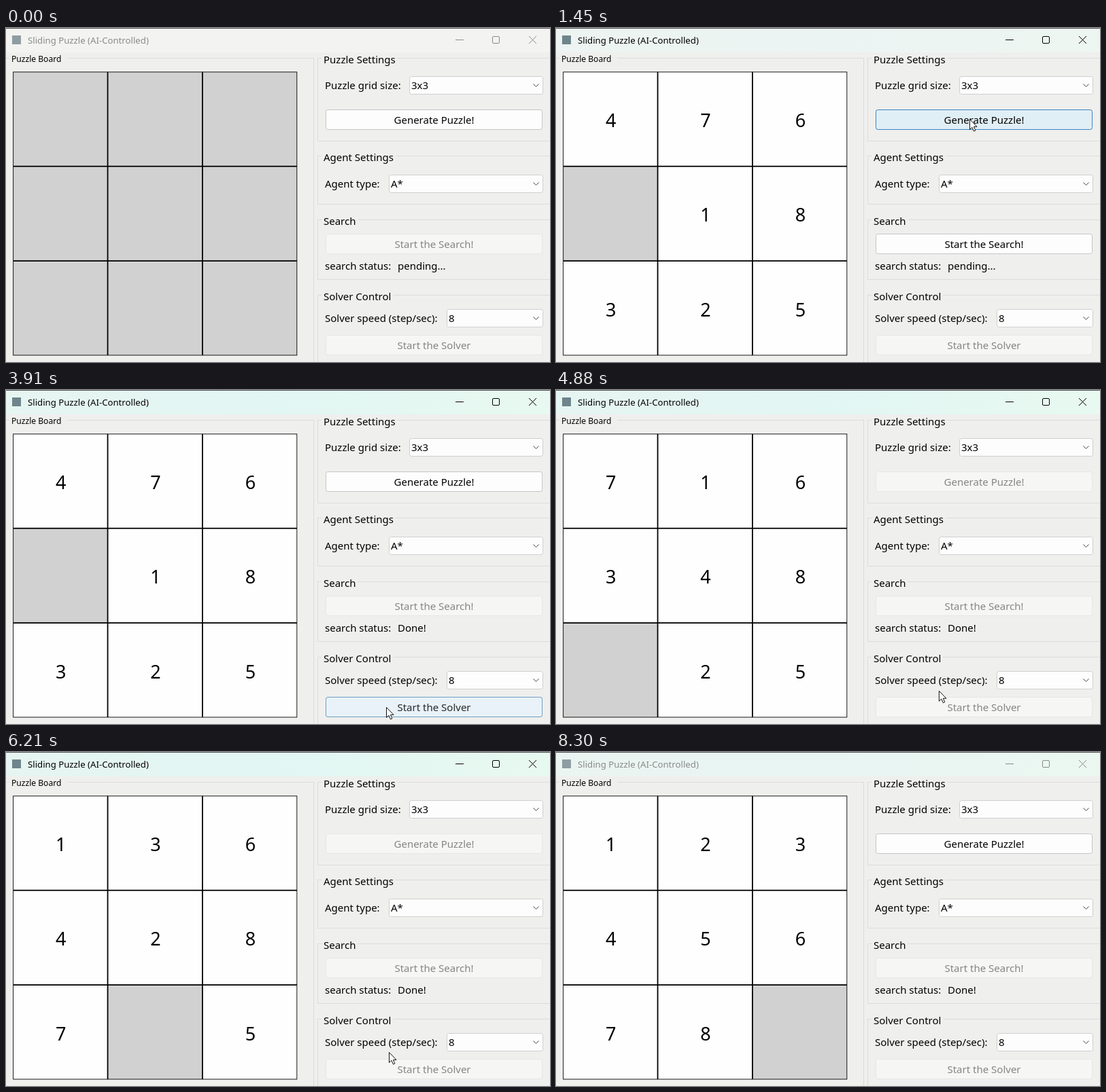
Animation, 800 px wide and 492 px high, one loop 8330 ms. Source, as an HTML page with a canvas:

```html
<!DOCTYPE html>
<html lang="en">
<head>
<meta charset="utf-8">
<title>Sliding Puzzle</title>
<style>
html, body { margin: 0; width: 100%; height: 100%; overflow: hidden; background: #efefee; }
canvas { display: block; }
</style>
</head>
<body>
<canvas id="stage" width="800" height="492"></canvas>
<script>
const ctx = document.getElementById('stage').getContext('2d');

const START = '476018325', MOVES = 'URDLDRULURDDLURDRUULDDR';
const OFFSET = { U: -3, D: 3, L: -1, R: 1 };

// Event times in ms
const LOOP = 8330, STEP = 126, FIRST_STEP = 4270;
const FOCUS = 1330, GENERATE = 1385, SEARCH = 2640, FOUND = 2700, SOLVE = 4010, BLUR = 8210;
const SOLVED = FIRST_STEP + STEP * MOVES.length;

// Pointer glides: start time and destination
const GLIDE = 720, ENTER = 550, LEAVE = 6750;
const STOPS = [[ENTER, 608, 134], [1760, 580, 317], [3150, 559, 467], [4240, 563, 442], [LEAVE, 560, 496]];

// 0 before a, rising to 1 over the duration
const fade = (t, a, duration) => Math.min(1, Math.max(0, (t - a) / duration));
const pulse = (t, a, b, duration) => fade(t, a, duration) - fade(t, b, duration);
const enabled = (t, a, b) => pulse(t, a, b, 50);
const hovered = (t, a, b) => pulse(t, a, b, 240);

function text(s, x, y, size = 15, color = '#000', align = 'left') {
  ctx.font = `${size}px "Noto Sans", "Open Sans", sans-serif`;
  ctx.textAlign = align;
  ctx.fillStyle = color;
  ctx.fillText(s, x, y);
}

function rect(x, y, w, h, color) {
  ctx.fillStyle = color;
  ctx.fillRect(x, y, w, h);
}

function line(color, ...points) {
  ctx.strokeStyle = color;
  ctx.beginPath();
  for (let i = 0; i < points.length; i += 2) ctx.lineTo(points[i], points[i + 1]);
  ctx.stroke();
}

function box(x, y, w, h, fill, border, radius = 3) {
  ctx.beginPath();
  ctx.roundRect(x + .5, y + .5, w - 1, h - 1, radius);
  ctx.fillStyle = fill;
  ctx.fill();
  ctx.strokeStyle = border;
  ctx.stroke();
}

function titleBar(t) {
  const active = t >= FOCUS && t < BLUR;
  const ink = active ? '#000' : '#8a8a8a';
  rect(0, 0, 800, 36, '#f3f3f2');
  const tint = ctx.createLinearGradient(0, 0, 800, 0);
  tint.addColorStop(0, '#e6f5f1');
  tint.addColorStop(.5, '#e2f6f3');
  tint.addColorStop(1, '#e7f9f0');
  ctx.globalAlpha = pulse(t, FOCUS, BLUR, 260);
  rect(0, 0, 800, 36, tint);
  ctx.globalAlpha = 1;
  rect(0, 0, 800, 1, '#555');
  rect(9, 11, 13, 13, active ? '#6f858c' : '#8e9da2');
  text('Sliding Puzzle (AI-Controlled)', 32, 22.5, 13.2, ink);
  line(ink, 661, 17.5, 673, 17.5);
  box(715, 12, 11, 11, 'transparent', ink, 1.5);
  line(ink, 769, 12, 780, 23);
  line(ink, 780, 12, 769, 23);
}

function group(label, top, bottom) {
  text(label, 467, top + 8);
  const end = 470 + ctx.measureText(label).width;
  line('#dcdcdc', 464, top + .5, 458.5, top + .5, 458.5, bottom + .5, 800, bottom + .5);
  line('#dcdcdc', end, top + .5, 800, top + .5);
}

function combo(label, value, x, y) {
  text(label, 469, y + 19);
  box(x, y, 790 - x, 27, '#fdfdfd', '#cfcfcf');
  text(value, x + 3, y + 19);
  line('#444', 775.5, y + 11.5, 779.5, y + 15.5, 783.5, y + 11.5);
}

function button(label, y, on, hover) {
  const layer = (alpha, fill, border, ink) => {
    ctx.globalAlpha = alpha;
    box(470, y, 319, 30, fill, border);
    text(label, 629.5, y + 21, 15, ink, 'center');
  };
  layer(1, '#f6f6f5', '#e6e6e5', '#858585');
  if (on) layer(on, '#fdfdfd', '#c6c6c6', '#000');
  if (on * hover) layer(on * hover, '#e0eef6', '#3c86bd', '#000');
  ctx.globalAlpha = 1;
}

function boardAt(t) {
  const tiles = [...START];
  const steps = Math.floor((t - FIRST_STEP) / STEP) + 1;
  let hole = tiles.indexOf('0');
  for (const move of MOVES.slice(0, Math.max(0, steps))) {
    const next = hole + OFFSET[move];
    [tiles[hole], tiles[next]] = [tiles[next], '0'];
    hole = next;
  }
  return tiles;
}

function board(t) {
  const left = 10.2, top = 64.4, pitch = 139.35, edge = .9;
  text('Puzzle Board', 8, 49.5, 12.1);
  line('#dcdcdc', 0, 44.5, 5, 44.5);
  line('#dcdcdc', 90, 44.5, 452.5, 44.5, 452.5, 492);
  rect(left, top, 3 * pitch, 3 * pitch, '#000');
  boardAt(t).forEach((tile, i) => {
    const x = left + i % 3 * pitch, y = top + Math.floor(i / 3) * pitch;
    const shown = t >= GENERATE && tile !== '0';
    rect(x + edge, y + edge, pitch - 2 * edge, pitch - 2 * edge, shown ? '#fefefe' : '#d2d1d1');
    if (shown) text(tile, x + 70.5, y + 81.5, 27, '#000', 'center');
  });
}

function pointer(t) {
  if (t < ENTER || t > LEAVE + GLIDE) return;
  let px = 592, py = 494;
  for (const [start, x, y] of STOPS) {
    const k = fade(t, start, GLIDE), ease = k * k * (3 - 2 * k);
    px += (x - px) * ease;
    py += (y - py) * ease;
  }
  const arrow = new Path2D('M0 0V15L3.4 11.8L6 17.5L8.4 16.4L5.9 10.9H10.5Z');
  ctx.save();
  ctx.translate(px + .5, py + .5);
  ctx.fillStyle = '#fff';
  ctx.fill(arrow);
  ctx.strokeStyle = '#111';
  ctx.stroke(arrow);
  ctx.restore();
}

function draw(t) {
  rect(0, 0, 800, 492, '#efefee');
  titleBar(t);
  board(t);

  group('Puzzle Settings', 44, 166);
  combo('Puzzle grid size:', '3x3', 593, 71);
  button('Generate Puzzle!', 120, 1 - enabled(t, SEARCH, FOUND) - enabled(t, SOLVE, SOLVED), hovered(t, 1100, 1860));

  group('Agent Settings', 188, 259);
  combo('Agent type:', 'A*', 563, 216);

  group('Search', 282, 370);
  button('Start the Search!', 303, enabled(t, GENERATE, SEARCH), hovered(t, 2280, SEARCH));
  text('search status:', 469, 356);
  text(t < FOUND ? 'pending...' : 'Done!', 576, 356);

  group('Solver Control', 393, 500);
  combo('Solver speed (step/sec):', '8', 648, 414);
  button('Start the Solver', 452, enabled(t, FOUND, SOLVE), hovered(t, 3750, SOLVE));

  pointer(t);
}

function frame() {
  draw(performance.now() % LOOP);
  requestAnimationFrame(frame);
}
frame();
</script>
</body>
</html>
```
